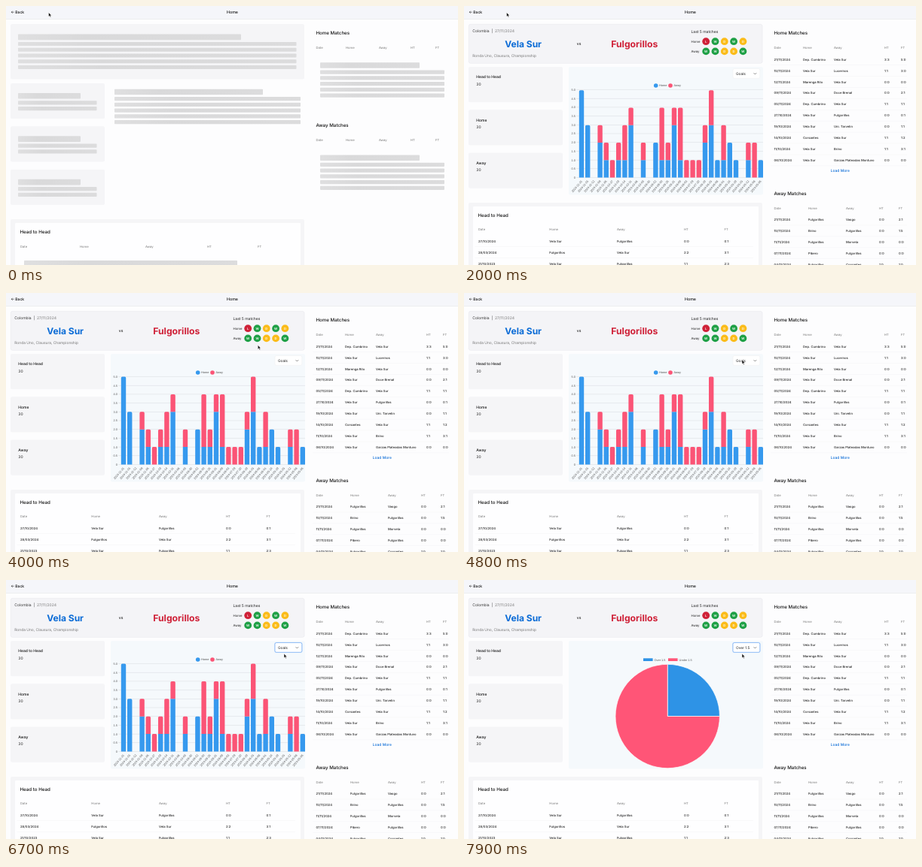
Recreate the animation shown at these times as an HTML page. Size 600x345 px, loop 8 s.

```html
<!DOCTYPE html>
<html lang="en">
<head>
<meta charset="utf-8">
<title>Match overview</title>
<style>
html, body { margin: 0; width: 100%; height: 100%; overflow: hidden; background: #fdfdfe; }
svg { display: block; width: 100vw; height: 100vh; }
text { font-family: Inter, sans-serif; text-rendering: geometricPrecision; white-space: pre; }
.chart text { font-family: "Liberation Sans", Arial, sans-serif; font-size: 3.9px; fill: #555; }
</style>
</head>
<body>
<svg id="stage" viewBox="0 0 600 345" preserveAspectRatio="none"></svg>
<script>
const NS = 'http://www.w3.org/2000/svg';
const stage = document.getElementById('stage');
const LOOP = 8000, LOADED = 1275, OPEN = 5500, CLOSE = 6400, SWITCH = 6850;
const BLUE = '#3699ee', RED = '#fb5476', PANEL = '#f5f5f7';
const HOME = 'Vela Sur', AWAY = 'Fulgorillos';

function add(parent, tag, attrs = {}, content) {
  const el = document.createElementNS(NS, tag);
  for (const k in attrs) el.setAttribute(k, attrs[k]);
  if (content !== undefined) el.textContent = content;
  parent.appendChild(el);
  return el;
}
const group = (parent, attrs) => add(parent, 'g', attrs);
const rect = (p, x, y, w, h, fill, rx = 0, more = {}) =>
  add(p, 'rect', { x, y, width: w, height: h, fill, rx, ...more });
const text = (p, x, y, str, size, fill = '#222', weight = 400, anchor = 'start') =>
  add(p, 'text', { x, y, 'font-size': size, fill, 'font-weight': weight, 'text-anchor': anchor }, str);
const path = (p, d, attrs) => add(p, 'path', { d, fill: 'none', ...attrs });
const show = (el, on) => el.setAttribute('display', on ? 'inline' : 'none');

const heading = (p, x, y, str) => text(p, x, y, str, 6.2, '#111', 500);
const headRow = (p, xs, y) =>
  ['Date', 'Home', 'Away', 'HT', 'FT'].forEach((s, i) => text(p, xs[i], y, s, 4.2, '#777'));

function table(p, title, x, y, xs, rows, right) {
  heading(p, x, y, title);
  headRow(p, xs, y + 18.6);
  rows.forEach((row, r) => {
    const base = y + 34.2 + r * 14.95;
    row.split('|').forEach((s, i) => text(p, xs[i], base, s, 4.2, '#222', 500));
    rect(p, x - 4, base + 5.6, right - x + 4, 0.35, '#ededf0');
  });
}

// Header
rect(stage, 0, 0, 600, 345, '#fdfdfe');
rect(stage, 0, 0, 600, 17, '#f5f6fa');
rect(stage, 0, 17, 600, 0.6, '#e3e4e8');
path(stage, 'M10.6 8.2H7.2M8.7 6.7L7.2 8.2L8.7 9.7', { stroke: '#222', 'stroke-width': 0.6 });
text(stage, 12.3, 10.1, 'Back', 5, '#111', 500);
text(stage, 300.5, 10.3, 'Home', 5.3, '#111', 500, 'middle');

// Loading placeholders
const loading = group(stage);
const grad = add(add(stage, 'defs'), 'linearGradient', { id: 'bone' });
add(grad, 'stop', { offset: 0, 'stop-color': '#dfdfe0' });
add(grad, 'stop', { offset: 0.3, 'stop-color': '#d9d9da' });
add(grad, 'stop', { offset: 1, 'stop-color': '#dcdcdd' });

function bones(x, y, titleW, w, lines) {
  rect(loading, x, y, titleW, 7.6, 'url(#bone)', 0.8);
  for (let i = 0; i < lines; i++) rect(loading, x, y + 10.3 + i * 7.75, w, 5.2, 'url(#bone)', 0.8);
}
rect(loading, 6, 24, 390, 73.5, PANEL, 2);
bones(16, 37.6, 296, 369.5, 5);
for (const y of [103, 160.3, 217.8]) {
  rect(loading, 6, y, 125, 47.2, PANEL, 2);
  bones(16, y + 13, 83, 104.5, 2);
}
bones(144, 110.7, 197, 247, 5);
for (const [title, y] of [['Home Matches', 38], ['Away Matches', 161.2]]) {
  heading(loading, 411.5, y, title);
  headRow(loading, [411.5, 451, 495, 537, 570], y + 19);
  bones(417, y + 37.2, 132, 165, 5);
}
rect(loading, 6, 284, 390, 70, PANEL, 2);
rect(loading, 12, 289, 379, 60, '#fefeff', 1);
heading(loading, 18.5, 302.7, 'Head to Head');
headRow(loading, [19, 98, 185, 267, 334], 321.5);
bones(24, 339, 283, 361, 1);

// Loaded page
const page = group(stage);
rect(page, 6.3, 24.3, 389.7, 52, '#f4f4f7', 2.5, { stroke: '#e8e8ec', 'stroke-width': 0.6 });
const meta = text(page, 11.3, 35.4, 'Colombia  |  ', 5, '#333');
add(meta, 'tspan', { fill: '#777' }, '27/11/2024');
text(page, 78.7, 54.6, HOME, 12, '#0a6bd6', 700, 'middle');
text(page, 226.3, 54.6, AWAY, 12.2, '#cf2138', 700, 'middle');
text(page, 152.6, 52, 'vs', 5, '#222', 500, 'middle');
text(page, 11.3, 68, 'Ronda Uno, Clausura, Championship', 4.9, '#777');
text(page, 301.5, 35.6, 'Last 5 matches', 5, '#222');
const tone = { W: '#1fa046', D: '#fbbc1a', L: '#cf2138' };
[['Home', 'LWDWD', 47.2], ['Away', 'WWDDW', 60.4]].forEach(([side, form, y]) => {
  text(page, 301.5, y + 1.6, side, 4.3, '#222');
  [...form].forEach((c, i) => {
    const cx = 321.2 + i * 12.3;
    add(page, 'circle', { cx, cy: y, r: 4.9, fill: tone[c] });
    text(page, cx, y + 1.5, c, 4.1, '#fff', 600, 'middle');
  });
});

[['Head to Head', 81], ['Home', 138.2], ['Away', 195.4]].forEach(([label, y]) => {
  rect(page, 6, y, 125, 47.3, PANEL, 2);
  text(page, 16.3, y + 15.4, label, 5, '#111', 500);
  text(page, 16.3, y + 25, '30', 5, '#222');
});

table(page, 'Home Matches', 411.5, 38.4, [411.5, 450, 491, 558, 580], [
  `21/11/2024|Dep. Cumbrino|${HOME}|3:3|5:0`,
  `15/11/2024|${HOME}|Lucernos|1:1|3:0`,
  `12/11/2024|Marenga Rilo|${HOME}|0:0|0:0`,
  `09/11/2024|${HOME}|Doce Brenal|0:0|2:1`,
  `05/11/2024|Dep. Cumbrino|${HOME}|1:1|1:1`,
  `27/10/2024|${HOME}|${AWAY}|0:0|0:1`,
  `19/10/2024|${HOME}|Uni. Tarvelin|0:0|1:1`,
  `14/10/2024|Corsantes|${HOME}|1:1|1:2`,
  `11/10/2024|${HOME}|Brino|1:1|3:1`,
  `06/10/2024|${HOME}|Garzas Plateadas Montuvo|0:0|0:0`
], 588);
text(page, 499.3, 220.8, 'Load More', 4.9, '#0a6bd6', 500, 'middle');
table(page, 'Away Matches', 411.5, 252, [411.5, 457, 507, 551, 577], [
  `21/11/2024|${AWAY}|Vasgo|0:0|2:1`,
  `15/11/2024|Brino|${AWAY}|0:0|1:5`,
  `11/11/2024|${AWAY}|Morvela|0:0|0:0`,
  `07/11/2024|Pibero|${AWAY}|0:0|0:0`,
  `04/11/2024|${AWAY}|Corsantes|1:0|1:0`
], 588);

rect(page, 6, 262, 390, 90, PANEL, 2);
rect(page, 12, 267, 379, 85, '#fefeff', 1);
table(page, 'Head to Head', 18.5, 280.6, [19, 113.3, 203, 292, 345.5], [
  `27/10/2024|${HOME}|${AWAY}|0:0|0:1`,
  `28/03/2024|${AWAY}|${HOME}|2:2|3:1`,
  `21/10/2023|${HOME}|${AWAY}|1:1|2:3`
], 384);

// Bar chart
rect(page, 139, 81, 258, 170.5, '#f5f9fc', 2);
const barChart = group(page, { class: 'chart' });
const ZERO = 228.5, UNIT = 23.4;
[['Home', 254.7, BLUE], ['Away', 274, RED]].forEach(([s, cx, fill]) => {
  add(barChart, 'circle', { cx, cy: 106, r: 2.8, fill });
  text(barChart, cx + 4.4, 107.4, s);
});
for (let v = 0; v <= 5; v += 0.5) {
  const y = ZERO - v * UNIT;
  rect(barChart, 149, y - 0.25, 248, 0.5, '#d6dade');
  text(barChart, 148, y + 1.4, v ? v.toFixed(1) : '0', 3.9, '#555', 400, 'end');
}
const bars = ('50 30 00 21 11 01 11 12 31 00 11 00 20 13 11 ' +
  '31 13 01 01 01 21 32 10 12 20 10 00 11 02 10').split(' ');
const days = ('11-21 11-15 11-12 11-09 11-05 10-27 10-19 10-14 10-11 10-06 ' +
  '10-03 09-30 09-22 08-30 08-25 08-21 08-09 08-03 07-29 07-20 ' +
  '06-19 06-15 06-08 06-01 05-24 05-19 05-15 05-12 05-08 05-05').split(' ');
const barX = i => 156 + i * 8.2;
days.forEach((d, i) => add(barChart, 'text', {
  'text-anchor': 'end', transform: `translate(${barX(i) + 1.2} 233.5) rotate(-50)`
}, '2024-' + d));
const homeBars = path(barChart, '', { fill: BLUE });
const awayBars = path(barChart, '', { fill: RED });

function column(x, from, to, round) {
  if (to <= from) return '';
  const y0 = ZERO - from * UNIT, y1 = ZERO - to * UNIT;
  const r = round ? Math.min(1.6, y0 - y1) : 0;
  return `M${x - 3.2} ${y0}V${y1 + r}q0 ${-r} ${r} ${-r}H${x + 3.2 - r}q${r} 0 ${r} ${r}V${y0}Z`;
}
function drawBars(k) {
  let home = '', away = '';
  bars.forEach((b, i) => {
    const h = b[0] * k, a = b[1] * k;
    home += column(barX(i), 0, h, !a);
    away += column(barX(i), h, h + a, true);
  });
  homeBars.setAttribute('d', home);
  awayBars.setAttribute('d', away);
}

// Pie chart
const pieChart = group(page, { class: 'chart' });
[['Over 1.5', 238, '#2e93e6'], ['Under 1.5', 271, '#ff5577']].forEach(([s, x, fill]) => {
  rect(pieChart, x, 104.3, 12.6, 3.7, fill);
  text(pieChart, x + 14.6, 107.5, s);
});
const edge = { stroke: '#fff', 'stroke-width': 0.7, 'stroke-linejoin': 'round' };
const over = path(pieChart, '', { ...edge, fill: '#2e93e6' });
const under = path(pieChart, '', { ...edge, fill: '#ff5577' });

function slice(from, to) {
  const at = f => {
    const a = (f - 0.25) * 2 * Math.PI;
    return `${270.2 + 69.2 * Math.cos(a)} ${181.5 + 69.2 * Math.sin(a)}`;
  };
  return `M270.2 181.5L${at(from)}A69.2 69.2 0 ${to - from > 0.5 ? 1 : 0} 1 ${at(to)}Z`;
}
function drawPie(k) {
  over.setAttribute('d', slice(0, 0.25 * k));
  under.setAttribute('d', slice(0.25 * k, k));
}

// Select box and its menu
const ring = rect(page, 356.2, 82.7, 37.4, 14.4, '#cfe3fb', 2.8);
const box = rect(page, 357, 83.5, 35.8, 12.8, '#fff', 2, { 'stroke-width': 0.6 });
const choice = text(page, 361, 91.7, 'Goals', 4.8, '#222');
path(page, 'M384.6 89.2L386.4 91L388.2 89.2', { stroke: '#444', 'stroke-width': 0.6 });

const menu = group(page);
rect(menu, 354, 83.6, 36.2, 54.4, '#4b4b4d', 2.6, { stroke: '#77777a', 'stroke-width': 0.4 });
rect(menu, 355.6, 94.9, 33, 8.3, '#1f6fe5', 1.4);
path(menu, 'M357.6 90.3L358.9 91.9L361 88.4', { stroke: '#fff', 'stroke-width': 0.7 });
['Goals', 'Over 1.5', 'Over 2.5', 'Over 3.5', 'GG', 'Draw'].forEach((s, i) =>
  text(menu, 362.8, 92.2 + i * 8.35, s, 4.8, '#f2f2f2'));

const cursor = path(stage, 'M0 0V5.6L1.3 4.4L2.2 6.4L3.2 6L2.3 4H4Z',
  { style: 'fill:#111', stroke: '#fff', 'stroke-width': 0.5 });

const easeOut = t => 1 - Math.pow(1 - Math.min(1, Math.max(0, t)), 4);
const track = [[0, 56.5, 8.7], [3780, 56.5, 8.7], [4000, 334.3, 69.4], [4550, 369, 89],
  [OPEN, 369, 89], [5680, 369.4, 96.8], [6400, 369.2, 97.2], [6600, 369, 98.2], [LOOP, 369, 98.2]];

function cursorAt(t) {
  const i = track.findIndex((p, n) => n && t <= p[0]);
  const [t0, x0, y0] = track[i - 1], [t1, x1, y1] = track[i];
  const f = (t - t0) / (t1 - t0), e = f * f * (3 - 2 * f);
  return [x0 + (x1 - x0) * e, y0 + (y1 - y0) * e];
}

function render(t) {
  const ready = t >= LOADED, pie = t >= SWITCH, focus = t >= OPEN;
  show(loading, !ready);
  show(page, ready);
  show(barChart, !pie);
  show(pieChart, pie);
  if (ready && !pie) drawBars(easeOut((t - LOADED) / 1000));
  if (pie) drawPie(easeOut((t - SWITCH) / 1000));
  show(ring, focus);
  box.setAttribute('stroke', focus ? '#5b9df0' : '#f0f0f2');
  choice.textContent = pie ? 'Over 1.5' : 'Goals';
  show(menu, t >= OPEN && t < CLOSE + 150);
  menu.setAttribute('opacity', t < CLOSE ? 1 : Math.max(0, 1 - (t - CLOSE) / 150));
  cursor.setAttribute('transform', `translate(${cursorAt(t)})`);
}

const start = performance.now();
function tick() {
  render((performance.now() - start) % LOOP);
  requestAnimationFrame(tick);
}
render(0);
requestAnimationFrame(tick);
</script>
</body>
</html>
```
